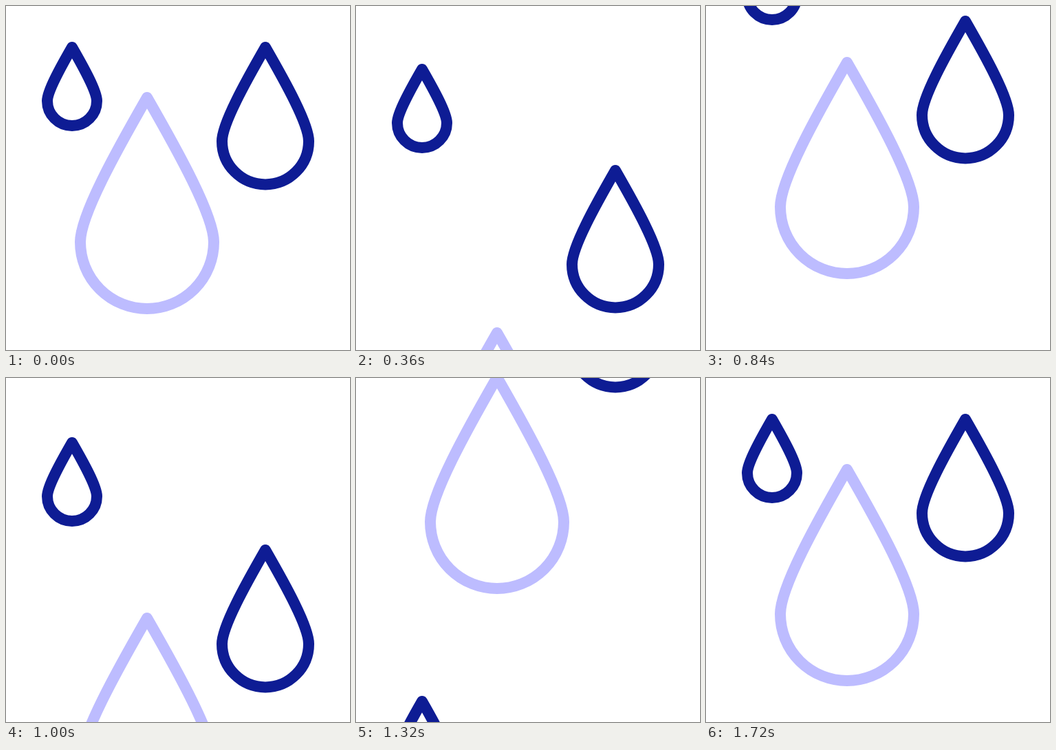
Write an HTML page that moves like this. It is 500x500 px and loops after 2 s.

```html
<!DOCTYPE html>
<html lang="en">
<head>
<meta charset="utf-8">
<title>Falling drops</title>
<style>
  html, body { margin: 0; width: 100%; height: 100%; overflow: hidden; background: #fff; }
  svg { display: block; width: 100%; height: 100%; }
  path { fill: none; stroke-width: 16; stroke-linejoin: round; }
</style>
</head>
<body>
<svg id="stage" viewBox="0 0 500 500"></svg>
<script>
const LOOP = 2000, STEP = 40;
const NAVY = '#0e1c94', LILAC = '#bdbcff';

// x, y: tip of the drop; r: radius of its round base.
// Each move is [start ms, end ms, from, to] in vertical offset: leave, cross, settle.
const drops = [
  { x: 205, y: 133, r: 97, color: LILAC, settle: 1.45,
    moves: [[0, 395, 0, 400], [600, 1120, -453, 417], [1120, 1470, -458, 0]] },
  { x: 377, y: 60, r: 63, color: NAVY, settle: 1.404,
    moves: [[130, 551, 0, 500], [640, 1240, -324, 533], [1280, 1600, -297, 0]] },
  { x: 96, y: 60, r: 36, color: NAVY, settle: 1.466,
    moves: [[265, 743, 0, 500], [800, 1400, -201, 504], [1440, 1720, -277, 0]] }
];

function outline({ x, y, r }) {
  const at = (dx, dy) => `${x + dx * r} ${y + dy * r}`;
  return `M${at(0, 0)}C${at(-0.474, 0.825)} ${at(-1, 1.773)} ${at(-1, 2.165)}` +
    `A${r} ${r} 0 0 0 ${at(1, 2.165)}` +
    `C${at(1, 1.773)} ${at(0.474, 0.825)} ${at(0, 0)}Z`;
}

function offset({ moves, settle }, time) {
  const eases = [p => p ** 1.7, p => p, p => 1 - (1 - p) ** settle];
  let index = 0;
  while (index < 2 && time >= moves[index + 1][0]) index++;
  const [start, end, from, to] = moves[index];
  const progress = Math.min(1, Math.max(0, (time - start) / (end - start)));
  return from + (to - from) * eases[index](progress);
}

const stage = document.getElementById('stage');
for (const drop of drops) {
  drop.path = document.createElementNS(stage.namespaceURI, 'path');
  drop.path.setAttribute('d', outline(drop));
  drop.path.setAttribute('stroke', drop.color);
  stage.append(drop.path);
}

const origin = performance.now();
function draw() {
  const elapsed = (performance.now() - origin) % LOOP;
  const time = Math.floor(elapsed / STEP) * STEP;
  for (const drop of drops) {
    drop.path.setAttribute('transform', `translate(0 ${Math.round(offset(drop, time))})`);
  }
  requestAnimationFrame(draw);
}
draw();
</script>
</body>
</html>
```
